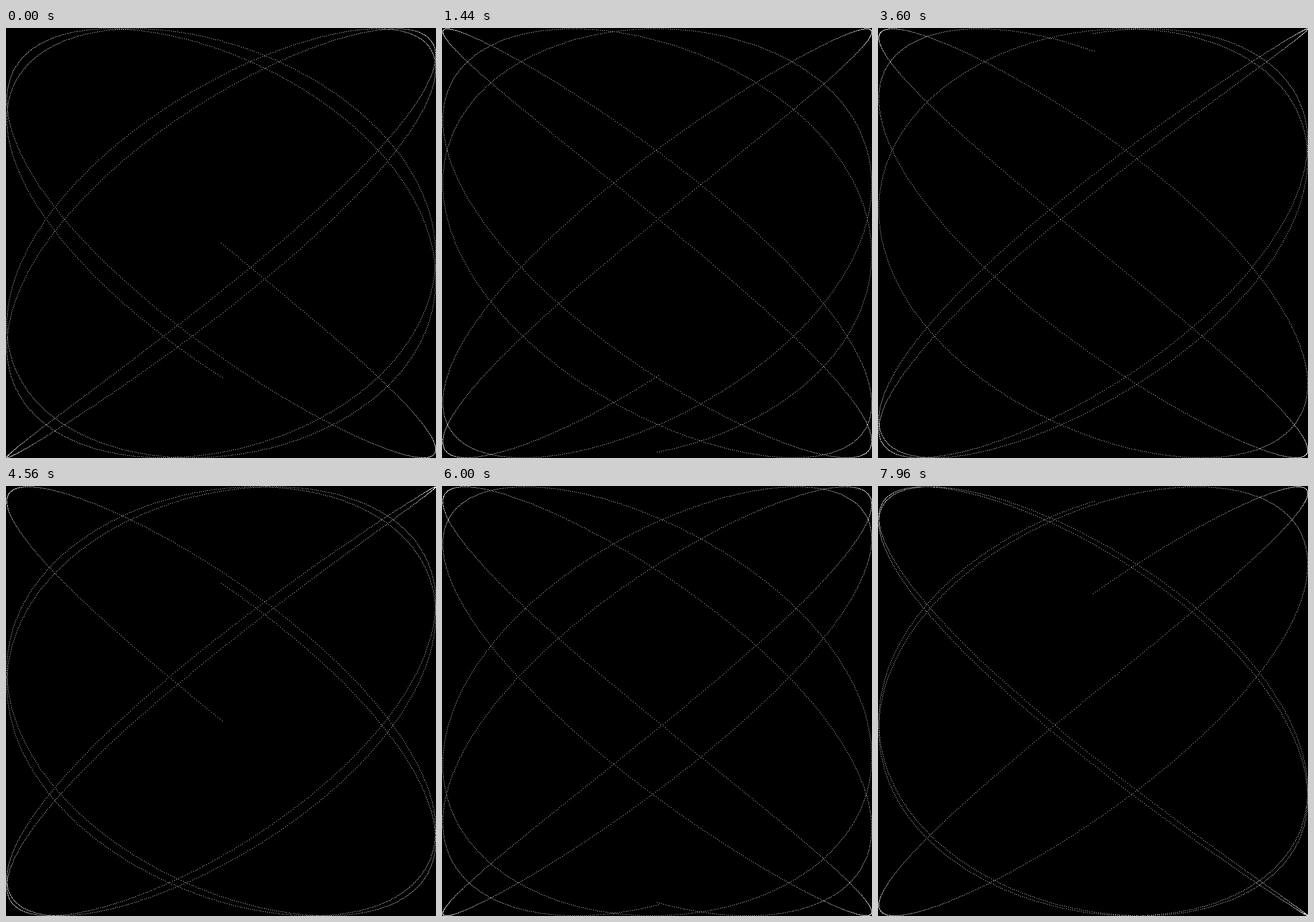
An HTML page with a canvas that plays this animation: 748 px wide and 748 px high, repeating every 8000 ms.

```html
<!DOCTYPE html>
<html lang="en">
<head>
<meta charset="utf-8">
<title>Lissajous curve</title>
<style>
  html, body { margin: 0; width: 100%; height: 100%; overflow: hidden; background: #000; }
  canvas { display: block; width: 748px; height: 748px; }
</style>
</head>
<body>
<canvas width="748" height="748"></canvas>
<script>
const SIZE = 748;
const CENTER = 374;
const RADIUS = 373;
const CYCLES = 5;
const STEP = 0.01;
const DOTS = Math.round(CYCLES * 2 * Math.PI / STEP);
const FREQ = 0.8214;
const PHASE_STEP = 0.05;
const FRAME_MS = 40;
const FRAMES = 200;

const ctx = document.querySelector('canvas').getContext('2d');
const start = performance.now();
let shown = -1;

const toPixel = v => Math.round(CENTER + RADIUS * v);

function draw(frame) {
  const phase = frame * PHASE_STEP;
  ctx.fillStyle = '#000';
  ctx.fillRect(0, 0, SIZE, SIZE);
  ctx.fillStyle = '#fff';
  for (let i = 0; i <= DOTS; i++) {
    const t = i * STEP;
    ctx.fillRect(toPixel(Math.sin(t)), toPixel(Math.sin(t * FREQ + phase)), 1, 1);
  }
}

function tick() {
  const elapsed = Math.max(0, performance.now() - start);
  const frame = Math.floor(elapsed / FRAME_MS) % FRAMES;
  if (frame !== shown) draw(shown = frame);
  requestAnimationFrame(tick);
}
tick();
</script>
</body>
</html>
```
